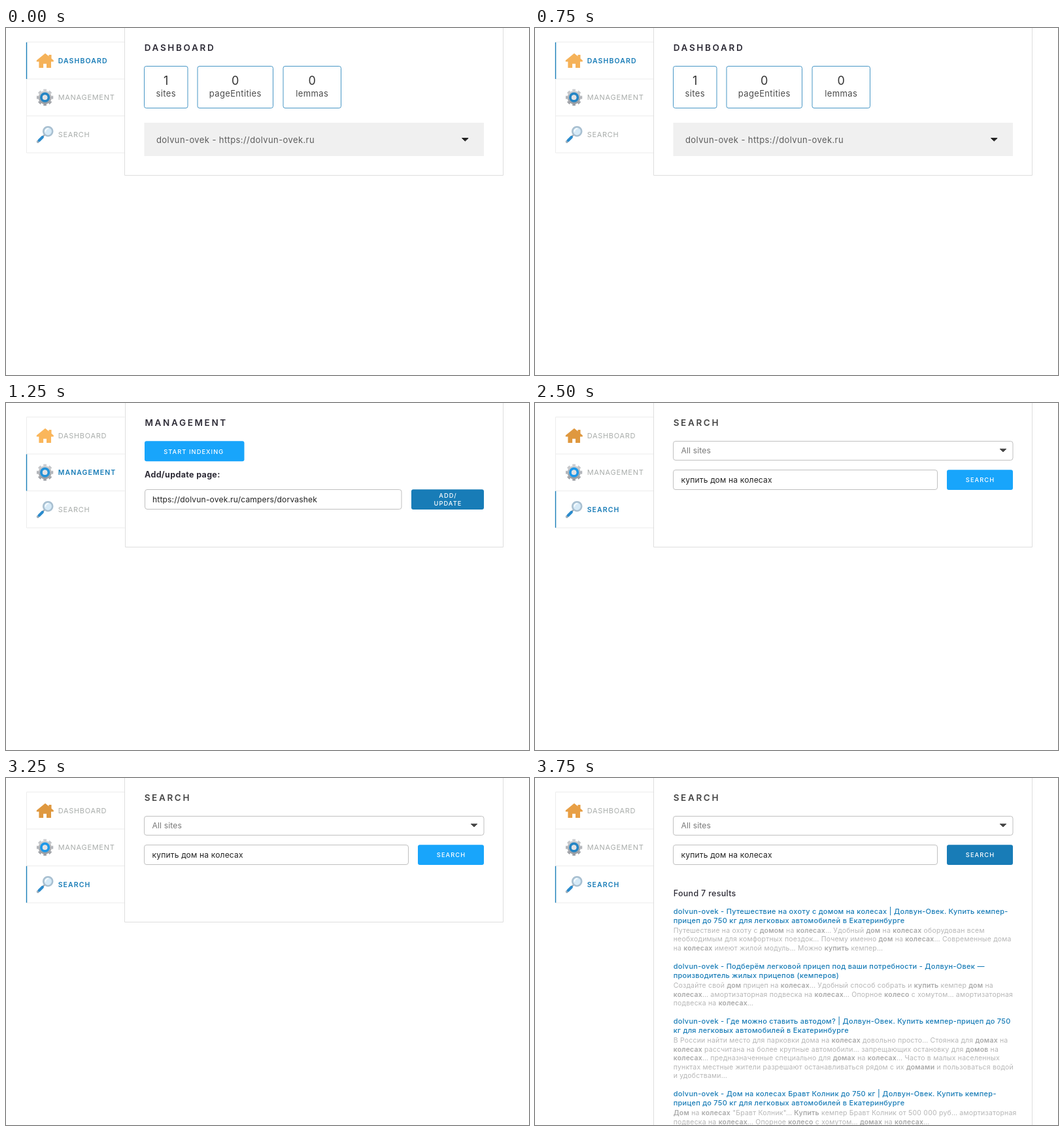
These frames come from a looping animation (800x531 px, 5000 ms). An HTML page:

```html
<!DOCTYPE html>
<html lang="en">
<head>
<meta charset="utf-8">
<title>Search engine panel</title>
<style>
html, body { margin: 0; width: 100%; height: 100%; overflow: hidden; background: #fff; }
svg { display: block; width: 100vw; height: 100vh; }
text { font-family: Inter, "Open Sans", sans-serif; white-space: pre; }
.head { font-size: 13.5px; font-weight: 600; letter-spacing: 2.65px; }
.item { font-size: 11px; letter-spacing: .7px; fill: #a9adab; }
.item.on { font-size: 10.5px; font-weight: 600; letter-spacing: 1.1px; }
.count { font-size: 18px; fill: #333; }
.label { font-size: 13px; letter-spacing: .35px; fill: #4b4b4b; }
.pick { font-size: 13px; letter-spacing: .4px; fill: #5c5c5c; }
.field { font-size: 12.1px; letter-spacing: .15px; fill: #222; }
.bold { font-size: 12.5px; font-weight: 700; letter-spacing: .35px; fill: #2c2a35; }
.btn { font-size: 9.3px; font-weight: 500; letter-spacing: 1.05px; fill: #fff; }
.found { font-size: 12.5px; font-weight: 500; letter-spacing: .3px; fill: #2c2a35; }
.title { font-size: 11px; font-weight: 500; letter-spacing: .28px; fill: #187cb7; }
.desc { font-size: 10.5px; letter-spacing: .2px; fill: #b6b6b6; }
.desc tspan { font-weight: 600; fill: #a9a9a9; }
.mid { text-anchor: middle; }
</style>
</head>
<body>
<svg id="stage" viewBox="0 0 800 531">
  <defs>
    <linearGradient id="steel" x1="0" y1="0" x2="0" y2="1">
      <stop offset="0" stop-color="#ccced1"/><stop offset="1" stop-color="#9a9da3"/>
    </linearGradient>
  </defs>
  <g id="view"></g>
</svg>
<script>
const BLUE = '#187cb7', BRIGHT = '#18a5fb';
const LINE = 13.4;

const text = (cls, x, y, s, fill) =>
  `<text class="${cls}" x="${x}" y="${y}"${fill ? ` style="fill:${fill}"` : ''}>${s}</text>`;
const box = (x, y, w, h, stroke, r = 3.5, fill = '#fff') =>
  `<rect x="${x}" y="${y}" width="${w}" height="${h}" rx="${r}" fill="${fill}" stroke="${stroke}" stroke-width=".8"/>`;
const button = (x, y, w, h, fill) => box(x, y, w, h, 'none', 3, fill);
const arrow = (x, y, c) =>
  `<path d="M${x - 4.8} ${y}h9.6l-4.8 4.4z" fill="${c}" stroke="${c}" stroke-linejoin="round"/>`;

const house = c =>
  `<path fill="${c}" d="M60 38.8 46.8 49.6v1.8h3.6v9.7h6.7v-6.3h4.9v6.3h7v-9.7h3.8v-1.8l-3.3-2.9v-5.6h-4v2.2z"/>`;

const gear = c => `<g transform="translate(59.6 106.2)" fill="none">
  <circle r="11.2" stroke="url(#steel)" stroke-width="3" pathLength="16" stroke-dasharray="1.1 .9" stroke-dashoffset=".55"/>
  <circle r="8.6" stroke="url(#steel)" stroke-width="3.4"/>
  <circle r="5.6" stroke="${c}" stroke-width="4"/>
  <circle r="3.8" fill="#e2e2e4"/></g>`;

const lens = `<g stroke-linecap="round">
  <path d="M58.5 164 55 167.5" stroke="#9aa5ae" stroke-width="2.4"/>
  <path d="M49.3 173.4 48.8 173.9" stroke="#9fb0bd" stroke-width="4.2"/>
  <path d="M55.8 166.9 50.8 171.9" stroke="#2a8bcd" stroke-width="4.2"/>
  <circle cx="64.2" cy="158.2" r="7" fill="#d6eaf7" stroke="#a9c0d1" stroke-width="2.6"/>
  <path d="M60.5 158a4 4 0 0 1 4-4" fill="none" stroke="#fff" stroke-width="1.6"/></g>`;

function menu(active, roof, hub) {
  const items = ['DASHBOARD', 'MANAGEMENT', 'SEARCH'].map((s, i) => {
    const on = i === active, y = 22 + i * 56.4;
    return text('item' + (on ? ' on' : ''), 79.7, y + 32, s, on && BLUE) +
      (on ? `<path d="M31.5 ${y}v56" stroke="${BLUE}" stroke-width="1.4"/>` : '');
  });
  return `<path d="M31.5 21.5h150M31.5 78h150M31.5 134.5h150M31.5 191h150M31.5 21.5V191" stroke="#ececec" fill="none"/>` +
    items.join('') + house(roof) + gear(hub) + lens;
}

const panel = (x, bottom) =>
  `<path d="M${x} -1V${bottom}H760.5V-1" fill="#fff" stroke="#dedede"/>`;

function dashboard() {
  const stats = [[211.5, 66.5, 1, 'sites'], [293, 115.5, 0, 'pageEntities'], [424, 88.5, 0, 'lemmas']];
  return menu(0, '#f5b259', '#2585c4') + panel(181.5, 225.5) +
    text('head', 211.7, 34.5, 'DASHBOARD', '#2c2a35') +
    stats.map(([x, w, n, s]) => box(x, 58.5, w, 64, BLUE, 3) +
      text('count mid', x + w / 2, 86.5, n) + text('label mid', x + w / 2, 105, s)).join('') +
    box(211.5, 145, 519.5, 51, 'none', 0, '#f0f0f0') +
    text('pick', 230, 176.2, 'dolvun-ovek - https://dolvun-ovek.ru') + arrow(702.3, 168.6, '#222');
}

function management() {
  return menu(1, '#fab65b', '#2492d8') + panel(182.5, 220.5) +
    text('head', 212.5, 34.5, 'MANAGEMENT', '#2c2a35') +
    button(212, 58.3, 152.5, 31, BRIGHT) + text('btn mid', 287.3, 77.6, 'START INDEXING') +
    text('bold', 212, 114.4, 'Add/update page:') +
    box(212.5, 132.5, 392.5, 30, '#b0b0b0') +
    text('field', 224, 152, 'https://dolvun-ovek.ru/campers/dorvashek') +
    button(620, 132.3, 111, 30.8, BLUE) +
    text('btn mid', 676, 145.4, 'ADD/') + text('btn mid', 676, 157.2, 'UPDATE');
}

// Asterisks mark the matched words.
const results = [
  [['dolvun-ovek - Путешествие на охоту с домом на колесах | Долвун-Овек. Купить кемпер-',
    'прицеп до 750 кг для легковых автомобилей в Екатеринбурге'],
   ['Путешествие на охоту с *домом* на *колесах*... Удобный *дом* на *колесах* оборудован всем',
    'необходимым для комфортных поездок... Почему именно *дом* на *колесах*... Современные дома',
    'на *колесах* имеют жилой модуль... Можно *купить* кемпер...']],
  [['dolvun-ovek - Подберём легковой прицеп под ваши потребности - Долвун-Овек —',
    'производитель жилых прицепов (кемперов)'],
   ['Создайте свой *дом* прицеп на *колесах*... Удобный способ собрать и *купить* кемпер *дом* на',
    '*колесах*... амортизаторная подвеска на *колесах*... Опорное *колесо* с хомутом... амортизаторная',
    'подвеска на *колесах*...']],
  [['dolvun-ovek - Где можно ставить автодом? | Долвун-Овек. Купить кемпер-прицеп до 750',
    'кг для легковых автомобилей в Екатеринбурге'],
   ['В России найти место для парковки дома на *колесах* довольно просто... Стоянка для *домах* на',
    '*колесах* рассчитана на более крупные автомобили... запрещающих остановку для *домов* на',
    '*колесах*... предназначенные специально для *домах* на *колесах*... Часто в малых населенных',
    'пунктах местные жители разрешают останавливаться рядом с их *домами* и пользоваться водой',
    'и удобствами...']],
  [['dolvun-ovek - Дом на колесах Бравт Колник до 750 кг | Долвун-Овек. Купить кемпер-',
    'прицеп до 750 кг для легковых автомобилей в Екатеринбурге'],
   ['*Дом* на *колесах* "Бравт Колник"... *Купить* кемпер Бравт Колник от 500 000 руб... амортизаторная',
    'подвеска на *колесах*... Опорное *колесо* с хомутом... *домах* на *колесах*...']]
];

function resultList() {
  let y = 208;
  return text('found', 211.7, 180.6, 'Found 7 results') + results.map(([title, desc]) => {
    const out = title.map((s, i) => text('title', 211.7, y + i * 14, s)).join('') +
      desc.map((s, i) => text('desc', 211.7, y + 29 + i * LINE,
        s.replace(/\*(.+?)\*/g, '<tspan>$1</tspan>').replace(/\.\.\./g, '…'))).join('');
    y += 44 + desc.length * LINE;
    return out;
  }).join('');
}

function search(done) {
  return menu(2, done ? '#e89f45' : '#df983f', done ? '#2585c4' : '#1e98e8') +
    panel(181.5, done ? 600 : 220.5) +
    text('head', 211.7, 34.5, 'SEARCH', '#444') +
    box(211.5, 58.5, 519.5, 29, '#b0b0b0') + text('field', 223.5, 77, 'All sites', '#777') +
    arrow(716, 70.3, '#444') +
    box(211.5, 102.5, 404, 30, '#b0b0b0') + text('field', 223.5, 121.8, 'купить дом на колесах') +
    button(630, 102.3, 101, 30.6, done ? BLUE : BRIGHT) + text('btn mid', 681, 121.3, 'SEARCH') +
    (done ? resultList() : '');
}

const screens = [dashboard(), management(), search(false), search(true)];
const view = document.getElementById('view');
let shown = -1;

function draw() {
  const i = Math.floor(performance.now() % 5000 / 1250);
  if (i !== shown) view.innerHTML = screens[shown = i];
  requestAnimationFrame(draw);
}
draw();
</script>
</body>
</html>
```
